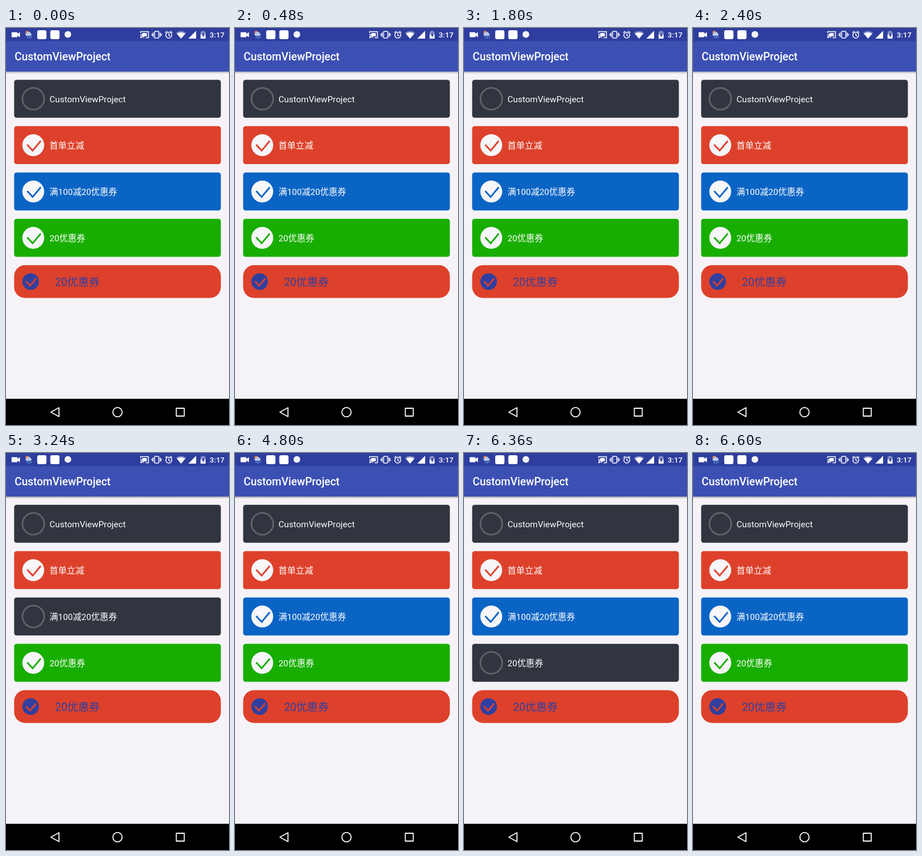
An HTML page that plays this animation: 400x711 px, repeating every 8 s.

```html
<!DOCTYPE html>
<html lang="zh">
<head>
<meta charset="utf-8">
<title>CustomViewProject</title>
<style>
  html, body { margin: 0; width: 100%; height: 100%; overflow: hidden; background: #f5f3f7; }
  svg { display: block; width: 100vw; height: 100vh; }
  text { font-family: Roboto, "Noto Sans CJK SC", "Noto Sans CJK", sans-serif; }
  .line { fill: none; stroke: #fff; }
</style>
</head>
<body>
<svg viewBox="0 0 400 711">
  <defs>
    <linearGradient id="shade" x1="0" y1="0" x2="0" y2="1">
      <stop offset="0" stop-color="#000" stop-opacity=".34"/>
      <stop offset="1" stop-color="#000" stop-opacity="0"/>
    </linearGradient>
  </defs>

  <rect width="400" height="711" fill="#f5f3f7"/>
  <rect y="77.5" width="400" height="4.5" fill="url(#shade)"/>
  <rect width="400" height="78" fill="#3c50b4"/>
  <rect width="400" height="23.5" fill="#2f3e9e"/>
  <text x="15.5" y="58.3" font-size="19.45" font-weight="500" fill="#fff">CustomViewProject</text>

  <!-- status bar, left -->
  <g fill="#fff">
    <path d="M11 7.5h8.500q1 0 1 1v2l4.500-3v9l-4.500-3v2q0 1-1 1h-8.500q-1 0-1-1v-7q0-1 1-1z"/>
    <rect x="56" y="4" width="16.500" height="16" rx="3"/>
    <rect x="79.500" y="4" width="16.500" height="16" rx="3"/>
    <circle cx="111" cy="11.500" r="6" fill="#f2f3f8"/>
  </g>
  <circle cx="38" cy="8" r="3" fill="#e9824d"/>
  <path d="M36.500 14a3 3 0 0 1 1-5.500a4 4 0 0 1 7 1a2.500 2.500 0 0 1 0 4.500z" fill="#b9c9e8"/>
  <path d="M39 15l-1.500 3M42.500 15l-1.500 4M46 15l-1.500 3" stroke="#65a9e5" stroke-width="1.300"/>

  <!-- status bar, right -->
  <g class="line" stroke-width="1.500">
    <path d="M241.500 9V6.500h14v11h-5M241 11.500a6 6 0 0 1 6 6M241 14.300a3.300 3.300 0 0 1 3.300 3.300"/>
    <rect x="244.500" y="9" width="8" height="6" fill="#fff" stroke="none"/>
    <circle cx="242" cy="17" r="1.200" fill="#fff" stroke="none"/>
    <rect x="266.500" y="6" width="7.500" height="12" rx="1"/>
    <path d="M264 8v8M276.500 8v8M262 10v4M278.500 10v4"/>
    <circle cx="292" cy="12.700" r="5.300"/>
    <path d="M292 9.500v3.500l2.500 1.500M285.800 8.500l3.500-3M298.200 8.500l-3.500-3"/>
  </g>
  <path d="M305 8.500Q314 1.800 323 8.500L314 19z" fill="#fff" fill-opacity=".38"/>
  <path d="M306.500 10.300Q314 5 321.500 10.300L314 19z" fill="#fff"/>
  <path d="M341 5v14h-14z" fill="#fff"/>
  <path d="M349 6.500h2.500V5h4v1.500h2.500v5.500h-9z" fill="#fff" fill-opacity=".4"/>
  <path d="M349 11.500h9v7.500h-9z" fill="#fff"/>
  <path d="M354.500 8l-3.500 5.500h2.300v3.800l3.300-5.500h-2.100z" fill="#2f3e9e"/>
  <text x="365.300" y="17" font-size="13.600" font-weight="500" fill="#fff">3:17</text>

  <g id="rows"></g>

  <rect y="664" width="400" height="47" fill="#000"/>
  <g class="line" stroke-width="1.800" stroke-linejoin="round">
    <path d="M80.500 688L95 680v16z"/>
    <circle cx="200" cy="688" r="8.300"/>
    <rect x="305.500" y="681" width="14.200" height="14"/>
  </g>
</svg>
<script>
const LOOP = 8000, DARK = '#31353f', RED = '#dd412b', INK = '#303f9f', PALE = '#f7f6f9';

// off: [start, end) spans in ms during which the row is unchecked
const rows = [
  { label: 'CustomViewProject', color: DARK, off: [[0, LOOP]] },
  { label: '首单立减', color: RED, off: [[120, 480], [960, 1800]] },
  { label: '满100减20优惠券', color: '#0a64c4', off: [[3120, 4800]] },
  { label: '20优惠券', color: '#18ae00', off: [[5640, 5880], [6360, 6600]] }
];

const root = document.getElementById('rows');

function add(tag, attrs, text) {
  const el = document.createElementNS('http://www.w3.org/2000/svg', tag);
  for (const key in attrs) el.setAttribute(key, attrs[key]);
  if (text) el.textContent = text;
  return root.appendChild(el);
}

function tick(d, color, width) {
  return add('path', { d, fill: 'none', stroke: color, 'stroke-width': width });
}

rows.forEach((row, i) => {
  const y = 92.8 + i * 83;
  row.card = add('rect', { x: 14.6, y, width: 370.8, height: 68, rx: 4.5 });
  row.ring = add('circle', { cx: 49, cy: y + 34, r: 19.5, fill: 'none', stroke: '#5f6269', 'stroke-width': 3 });
  row.disc = add('circle', { cx: 48.9, cy: y + 34, r: 19.6, fill: PALE });
  row.mark = tick(`M38 ${y + 33.2}L47.8 ${y + 43.8}L62.3 ${y + 26.5}`, row.color, 3);
  add('text', { x: 78, y: y + 40, 'font-size': 15.56, fill: '#fff' }, row.label);
});

add('rect', { x: 14.6, y: 424.8, width: 370.8, height: 58.6, rx: 19.5, fill: RED });
add('circle', { cx: 44.2, cy: 454.1, r: 14.9, fill: INK });
tick('M35.8 453.5L43.2 461.4L54.2 448.5', RED, 2.8);
add('text', { x: 88, y: 461.5, 'font-size': 19.45, fill: INK }, '20优惠券');

function draw(t) {
  for (const row of rows) {
    const on = !row.off.some(([start, end]) => t >= start && t < end);
    row.card.setAttribute('fill', on ? row.color : DARK);
    row.ring.setAttribute('visibility', on ? 'hidden' : 'visible');
    row.disc.setAttribute('visibility', on ? 'visible' : 'hidden');
    row.mark.setAttribute('visibility', on ? 'visible' : 'hidden');
  }
}

let begin;
function loop(now) {
  begin ??= now;
  draw((now - begin) % LOOP);
  requestAnimationFrame(loop);
}
draw(0);
requestAnimationFrame(loop);
</script>
</body>
</html>
```
